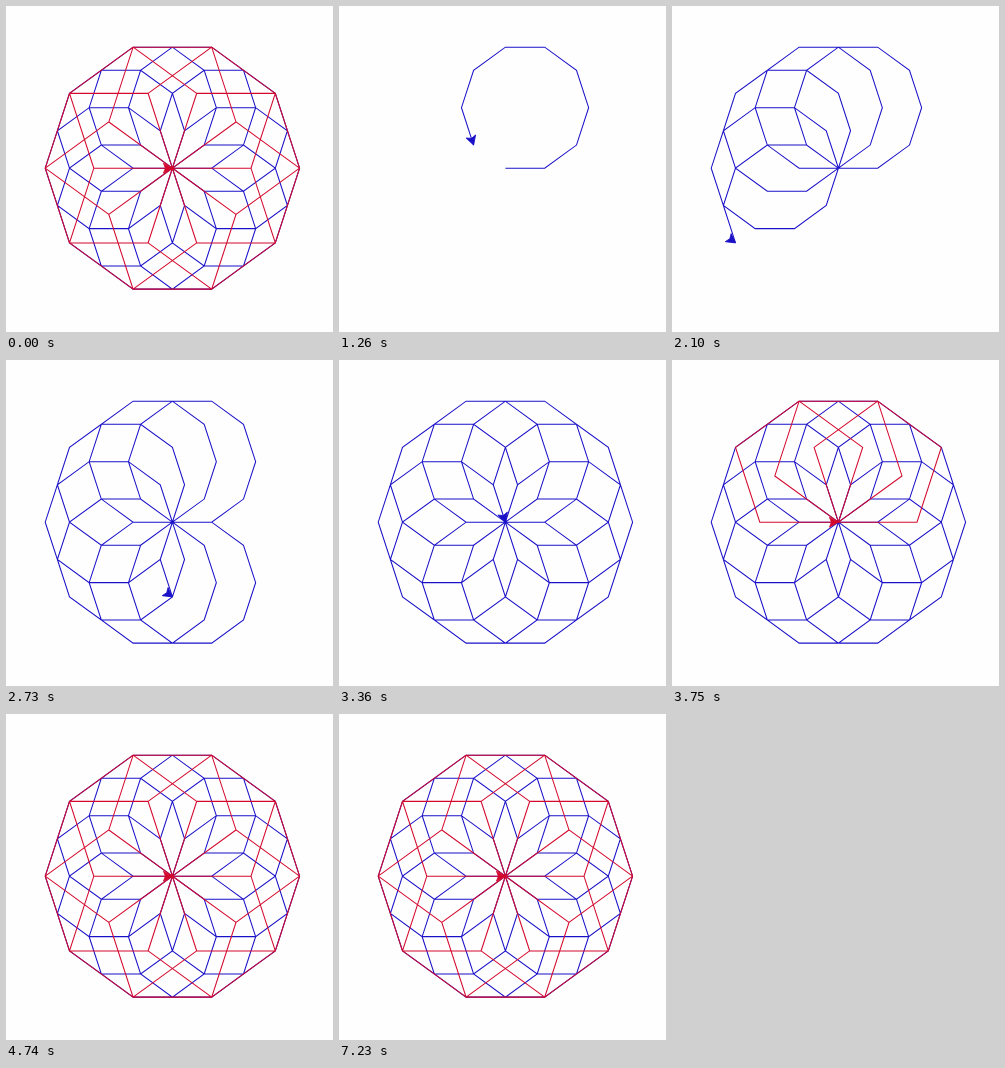
Write an HTML page that moves like this. It is 327x326 px and loops after 7.26 s.

```html
<!DOCTYPE html>
<html lang="en">
<head>
<meta charset="utf-8">
<title>Turtle rosette</title>
<style>
  html, body { margin: 0; width: 100%; height: 100%; overflow: hidden; background: #fefefe; }
  svg { display: block; width: 327px; height: 326px; }
  polyline { fill: none; stroke-width: 1.05; }
  #turtle { stroke-width: .8; }
</style>
</head>
<body>
<svg viewBox="0 0 327 326">
  <polyline id="blue" stroke="#1a10c8"/>
  <polyline id="red" stroke="#d4082c"/>
  <path id="turtle" d="M0 0L-9 -5L-7 0L-9 5Z"/>
</svg>
<script>
const LOOP = 7260, RESTART = 1260;
const CENTER = [166.4, 162.15], SIDE = 39.3;
const COLORS = { blue: '#1a10c8', red: '#d4082c' };

// [time in ms, turtle commands executed so far]
const PACE = [[1260, 18.5], [2100, 99.5], [3360, 218.5], [4140, 290.5], [4700, 340]];

const points = { blue: [CENTER], red: [CENTER] };
const states = [];
let [x, y] = CENTER, heading = 0, pen = 'blue';

// Every turtle command takes one tick and leaves one state.
function record() {
  states.push({ x, y, heading, pen, blue: points.blue.length, red: points.red.length });
}

function left(angle) {
  heading = (heading + angle) % 360;
  record();
}

function forward(distance) {
  const a = heading * Math.PI / 180;
  x += distance * Math.cos(a);
  y -= distance * Math.sin(a);
  points[pen].push([x, y]);
  record();
}

function rosette(color, sides, length) {
  for (let i = 0; i < 10; i++) {
    pen = color;
    record();
    for (let j = 0; j < sides; j++) {
      forward(length);
      left(360 / sides);
    }
    left(36);
  }
}

record();
rosette('blue', 10, SIDE);
rosette('red', 5, SIDE * 2);

function ticksAt(time) {
  const last = states.length - 1;
  if (time < RESTART) return last;
  for (let i = 1; i < PACE.length; i++) {
    const [t0, n0] = PACE[i - 1], [t1, n1] = PACE[i];
    if (time < t1) return Math.floor(n0 + (n1 - n0) * (time - t0) / (t1 - t0));
  }
  return last;
}

const el = id => document.getElementById(id);
const lines = { blue: el('blue'), red: el('red') }, turtle = el('turtle');
const start = performance.now();
let shown = -1;

function draw() {
  // The picture advances in 30 ms steps.
  const time = Math.floor((performance.now() - start) % LOOP / 30) * 30;
  const tick = ticksAt(time);
  if (tick !== shown) {
    shown = tick;
    const s = states[tick];
    for (const c in lines) {
      lines[c].setAttribute('points', points[c].slice(0, s[c]).join(' '));
    }
    turtle.setAttribute('transform', `translate(${s.x} ${s.y}) rotate(${-s.heading})`);
    turtle.setAttribute('fill', COLORS[s.pen]);
    turtle.setAttribute('stroke', COLORS[s.pen]);
  }
  requestAnimationFrame(draw);
}
draw();
</script>
</body>
</html>
```
